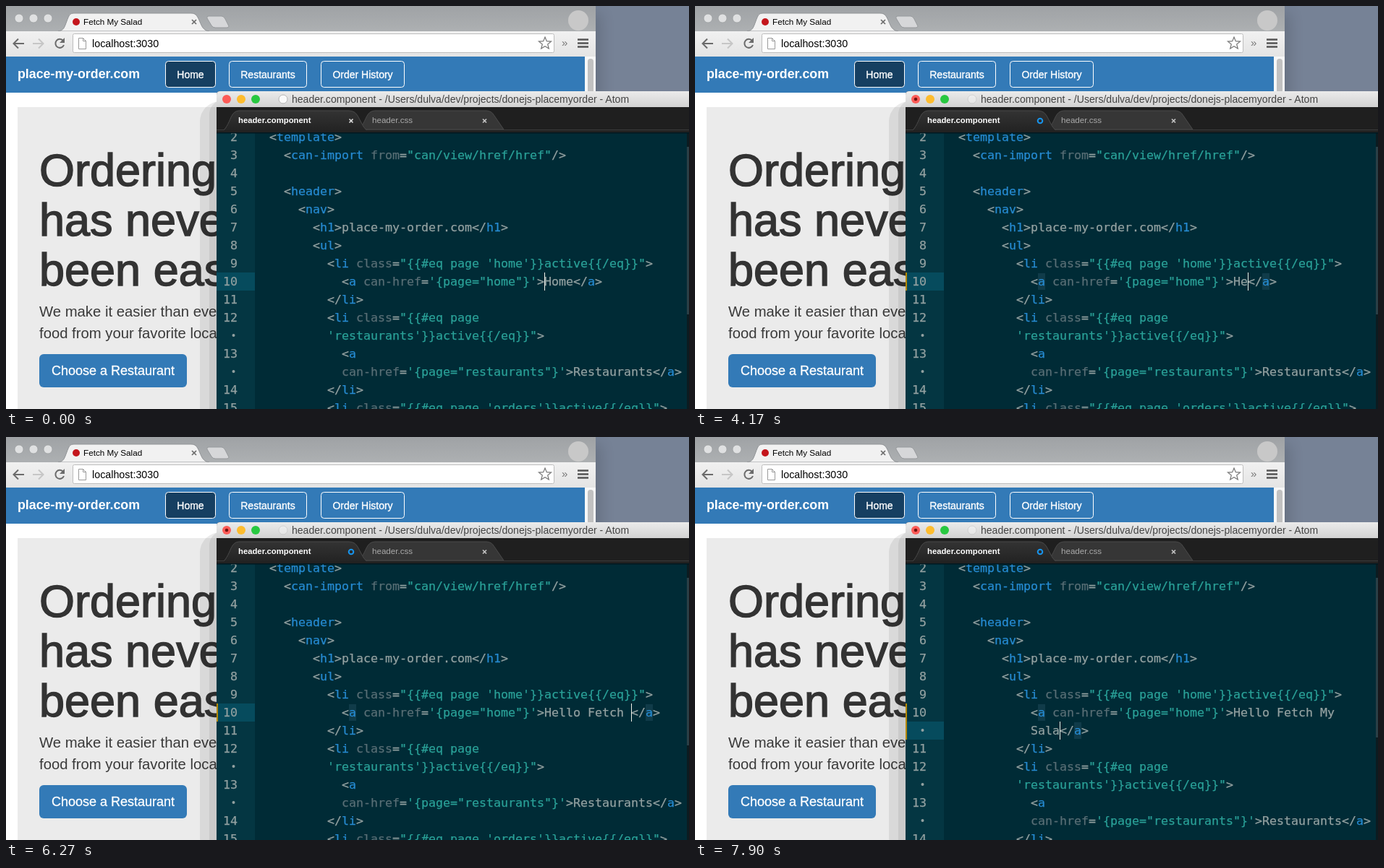
An HTML page for the animation above (8 s loop, 944 by 558 pixels).

```html
<!DOCTYPE html>
<html lang="en">
<head>
<meta charset="utf-8">
<title>Live editing</title>
<style>
  html, body { margin: 0; width: 100%; height: 100%; overflow: hidden; }
  svg { display: block; width: 944px; height: 558px; font-family: "Liberation Sans", Arial, sans-serif; }
  text { white-space: pre; }
  .shadow { filter: blur(10px); opacity: .14; }
  .hero { font-size: 63px; fill: #333; stroke: #333; stroke-width: 1.5; }
  .lead { font-size: 20.3px; fill: #3a3a3a; }
  .nav { font-size: 14px; fill: #fff; stroke: #fff; stroke-width: .35; }
  .nav rect { fill: none; stroke-width: 1; }
  .nav text { text-anchor: middle; }
  .line { fill: none; stroke: #6b6b6b; stroke-width: 2; }
  .cross { fill: none; stroke-width: 1.7; }
  .code { font: 16.61px "DejaVu Sans Mono", monospace; color: #93a1a1; fill: currentColor; }
  .code text { fill: currentColor; stroke: currentColor; stroke-width: .25; }
  .code .tag { color: #268bd2; }
  .code .attr { color: #586e75; }
  .code .string { color: #2aa198; }
</style>
</head>
<body>
<svg viewBox="0 0 944 558">
  <defs>
    <linearGradient id="titlebar" x2="0" y2="1"><stop stop-color="#ebebeb"/><stop offset="1" stop-color="#d2d2d2"/></linearGradient>
    <linearGradient id="strip" x2="0" y2="1"><stop stop-color="#9fa2a5"/><stop offset="1" stop-color="#adb0b2"/></linearGradient>
    <linearGradient id="toolbar" x2="0" y2="1"><stop stop-color="#f1f1f1"/><stop offset="1" stop-color="#e4e4e4"/></linearGradient>
    <linearGradient id="activeTab" x2="0" y2="1"><stop stop-color="#333"/><stop offset="1" stop-color="#222"/></linearGradient>
    <clipPath id="codeArea"><rect x="291" y="175" width="653" height="383"/></clipPath>
  </defs>

  <!-- desktop and browser -->
  <rect width="944" height="558" fill="#768296"/>
  <rect class="shadow" y="10" width="822" height="560"/>
  <rect width="815" height="558" fill="#fff"/>
  <rect width="815" height="35" fill="url(#strip)"/>
  <g fill="#dfe0e1" stroke="#989b9d" stroke-width=".7">
    <circle cx="18" cy="17" r="6"/><circle cx="38" cy="17" r="6"/><circle cx="58" cy="17" r="6"/>
  </g>
  <path d="M72 35C80 34 81 29 84 21S88 10 94 10H256C263 10 265 15 268 22S273 34 281 35Z" fill="#f1f1f1" stroke="#909396"/>
  <path d="M280 14H298Q301 14 303 18L308 28Q308 30 305 30H289Q286 30 284 27L278 17Q277 14 280 14Z" fill="#d6d7d9" stroke="#96999c"/>
  <circle cx="97" cy="22" r="5" fill="#c4161c"/>
  <text x="107" y="26" font-size="11.7">Fetch My Salad</text>
  <path class="cross" stroke="#6b6b6b" d="M257 19l6 6m0-6l-6 6"/>
  <circle cx="791" cy="20" r="14" fill="#c8c8c8"/>
  <rect y="35" width="815" height="35" fill="url(#toolbar)"/>
  <path class="line" d="M25 52H11M17 45.5l-6.5 6.5 6.5 6.5"/>
  <path class="line" style="stroke:#c6c6c6" d="M37 52H51M45 45.5l6.5 6.5-6.5 6.5"/>
  <path class="line" d="M79 48A6 6 0 1 0 80 54"/>
  <path d="M81 44v7h-7z" fill="#6b6b6b"/>
  <rect x="92.5" y="38.5" width="665" height="26" rx="2" fill="#fff" stroke="#bdbdbd"/>
  <path d="M100.5 44.5h6l4 4v11h-10zM106.5 44.5v4h4" fill="#fff" stroke="#9a9a9a"/>
  <text x="119" y="57" font-size="14.3">localhost:3030</text>
  <path d="M745 43l2.3 5.7 6.2.4-4.8 3.9 1.6 6-5.3-3.3-5.3 3.3 1.6-6-4.8-3.9 6.2-.4z" fill="none" stroke="#777" stroke-width="1.2"/>
  <text x="768" y="56" font-size="15" fill="#777">»</text>
  <path class="line" style="stroke:#555;stroke-width:2.5" d="M790 46.5h15m-15 5h15m-15 5h15"/>

  <!-- page -->
  <rect y="70" width="800" height="50" fill="#337ab7"/>
  <rect x="800" y="70" width="15" height="488" fill="#f7f7f7"/>
  <rect x="804" y="73" width="8" height="120" rx="4" fill="#c1c1c1"/>
  <text x="16" y="100" font-size="17.8" font-weight="bold" fill="#fff">place-my-order.com</text>
  <g class="nav">
    <rect x="220.5" y="76.5" width="69" height="36" rx="4" style="fill:#163f61"/><text x="255" y="100">Home</text>
    <rect x="308.5" y="76.5" width="107" height="36" rx="4"/><text x="362" y="100">Restaurants</text>
    <rect x="435.5" y="76.5" width="115" height="36" rx="4"/><text x="493" y="100">Order History</text>
  </g>
  <rect x="16" y="140" width="768" height="418" fill="#ebebeb"/>
  <g class="hero">
    <text x="46" y="248.500">Ordering food</text>
    <text x="46" y="317.500">has never</text>
    <text x="46" y="386.500">been easier</text>
  </g>
  <g class="lead">
    <text x="46" y="430">We make it easier than ever to order</text>
    <text x="46" y="460">food from your favorite local places</text>
  </g>
  <rect x="46" y="482" width="204" height="46" rx="6" fill="#337ab7"/>
  <text x="63" y="511" font-size="18" fill="#fff" stroke="#fff" stroke-width=".3">Choose a Restaurant</text>

  <!-- editor window -->
  <rect x="268" y="132" width="700" height="450" rx="28" opacity=".08"/>
  <rect x="281" y="130" width="700" height="450" rx="20" opacity=".07"/>
  <path d="M291 558V123Q291 118 296 118H944V558Z" fill="#1f1f1f"/>
  <path d="M291 140V123Q291 118 296 118H944V140Z" fill="url(#titlebar)"/>
  <circle cx="305" cy="129" r="6" fill="#fc5b57"/>
  <circle cx="325" cy="129" r="6" fill="#fdbc2e"/>
  <circle cx="345" cy="129" r="6" fill="#28c840"/>
  <circle id="proxy" cx="383" cy="129" r="6" fill="#fafafa" stroke="#b5b5b5"/>
  <text x="395" y="134" font-size="14.05" fill="#444">header.component - /Users/dulva/dev/projects/donejs-placemyorder - Atom</text>
  <path d="M484 171C492 169 494 162 498 154Q502 145 510 145H664Q671 145 675 152L688 171Z" fill="#363636" stroke="#4a4a4a"/>
  <path d="M291 171.5H944" stroke="#3c3c3c"/>
  <path d="M297 175C304 171 307 163 311 154Q315 145 322 145H474Q482 145 486 152L494 167Q497 172 503 175Z" fill="url(#activeTab)" stroke="#494949"/>
  <rect x="291" y="172" width="653" height="4" fill="#222"/>
  <text x="321" y="162" font-size="11.3" font-weight="bold" fill="#fff">header.component</text>
  <text x="506" y="162" font-size="11.6" fill="#aaa">header.css</text>
  <path id="closeTab" class="cross" stroke="#ddd" d="M474.500 156.500l5 5m0-5l-5 5"/>
  <path class="cross" stroke="#c4c4c4" d="M659 156.500l5 5m0-5l-5 5"/>
  <g id="modified">
    <circle cx="305" cy="129" r="2.3" fill="#70110f"/>
    <circle cx="477" cy="159" r="3.3" fill="none" stroke="#1795ee" stroke-width="2"/>
  </g>
  <g clip-path="url(#codeArea)">
    <rect x="291" y="175" width="653" height="383" fill="#002b36"/>
    <rect x="291" y="175" width="53" height="383" fill="#043642"/>
    <g id="code" class="code"></g>
    <rect x="291" y="175" width="653" height="1.5" fill="#001820"/>
  </g>
</svg>

<script>
const LOOP = 8000, CELL = 10, ROW = 25, LEFT = 344, TOP = 169;
const OLD_LABEL = 'Home', NEW_LABEL = 'Hello Fetch My Sala';
const EDIT_ROW = 8, LABEL_COL = 40, INDENT = 12, WRAP_AT = 15;
const deletions = [2390, 2680, 2980, 3280];
const keystrokes = [3880, 4170, 4470, 4620, 4770, 4920, 5220, 5520, 5670, 5820,
  5970, 6270, 6560, 6860, 7010, 7310, 7460, 7760, 7900];
const caretHidden = [[450, 750], [1200, 1640], [1940, 2390], [3730, 3880]];
const MODIFIED_AT = 3280;

const byId = id => document.getElementById(id);
const countPast = (times, t) => times.filter(time => time <= t).length;
const escapeText = s => s.replace(/&/g, '&amp;').replace(/</g, '&lt;');
const rect = (x, y, w, h, fill) => `<rect x="${x}" y="${y}" width="${w}" height="${h}" fill="${fill}"/>`;
const cellX = col => LEFT + col * CELL;
const rowY = row => TOP + row * ROW;
const label = (x, row, text, kind = '') =>
  `<text x="${x}" y="${rowY(row) + 18}" class="${kind}">${escapeText(text)}</text>`;

// A line break inside an entry is a soft wrap that keeps the indent.
const sourceLines = text => [
  '  <template>',
  '    <can-import from="can/view/href/href"/>',
  '',
  '    <header>',
  '      <nav>',
  '        <h1>place-my-order.com</h1>',
  '        <ul>',
  `          <li class="{{#eq page 'home'}}active{{/eq}}">`,
  `            <a can-href='{page="home"}'>${text}</a>`,
  '          </li>',
  `          <li class="{{#eq page\n'restaurants'}}active{{/eq}}">`,
  `            <a\ncan-href='{page="restaurants"}'>Restaurants</a>`,
  '          </li>',
  `          <li class="{{#eq page 'orders'}}active{{/eq}}">`,
];
const token = /(?<string>"[^"]*"|'[^']*')|(?<tag>(?<=<\/?)[\w-]+)|(?<attr>[\w-]+(?==))|[\w.-]+|[^]/g;

function drawLines(lines) {
  let out = '', row = 0;
  lines.forEach((line, i) => {
    const indent = line.search(/\S|$/);
    const number = String(i + 2);
    let col = 0;
    out += label(320 - number.length * CELL, row, number);
    for (const match of line.matchAll(token)) {
      const kind = Object.keys(match.groups).find(k => match.groups[k]) || '';
      match[0].split('\n').forEach((part, n) => {
        if (n) {
          row++;
          col = indent;
          out += `<circle cx="314.5" cy="${rowY(row) + 12}" r="2"/>`;
        }
        if (part.trim()) out += label(cellX(col), row, part, kind);
        col += part.length;
      });
    }
    row++;
  });
  return out;
}

// The caret stands after the typed text and before what is left of the old label.
function drawEditor(typed, rest, caretOn, modified) {
  const wrapped = typed.length > WRAP_AT;
  const caretRow = EDIT_ROW + wrapped;
  const caretCol = wrapped ? INDENT + typed.length - WRAP_AT : LABEL_COL + typed.length;
  const shown = wrapped ? typed.slice(0, WRAP_AT - 1) + '\n' + typed.slice(WRAP_AT) : typed;
  const match = (col, row) => rect(cellX(col), rowY(row) + 1, CELL, 23, '#103b49');

  let out = rect(291, rowY(caretRow), 53, ROW, '#064b5d');
  if (modified) {
    out += rect(291, rowY(EDIT_ROW), 2, ROW * (1 + wrapped), '#b58900');
    out += match(INDENT + 1, EDIT_ROW) + match(caretCol + 2, caretRow);
  }
  out += drawLines(sourceLines(shown + rest));
  if (caretOn) out += rect(cellX(caretCol), rowY(caretRow), 1, ROW, '#f0f0e8');
  out += rect(941, 175, 3, 383, '#0b1c21') + rect(941, 195, 3, wrapped ? 221 : 232, '#2a3f46');
  byId('code').innerHTML = out;
  byId('modified').style.display = modified ? '' : 'none';
  byId('closeTab').style.display = modified ? 'none' : '';
  byId('proxy').style.opacity = modified ? .4 : 1;
}

let lastState;
function tick(now) {
  const t = now % LOOP;
  const typed = NEW_LABEL.slice(0, countPast(keystrokes, t));
  const rest = OLD_LABEL.slice(countPast(deletions, t));
  const caretOn = !caretHidden.some(([from, to]) => t >= from && t < to);
  const modified = t >= MODIFIED_AT;
  const state = [typed, rest, caretOn, modified].join();
  if (state !== lastState) drawEditor(typed, rest, caretOn, modified);
  lastState = state;
  requestAnimationFrame(() => tick(performance.now() - start));
}
const start = performance.now();
tick(0);
</script>
</body>
</html>
```
